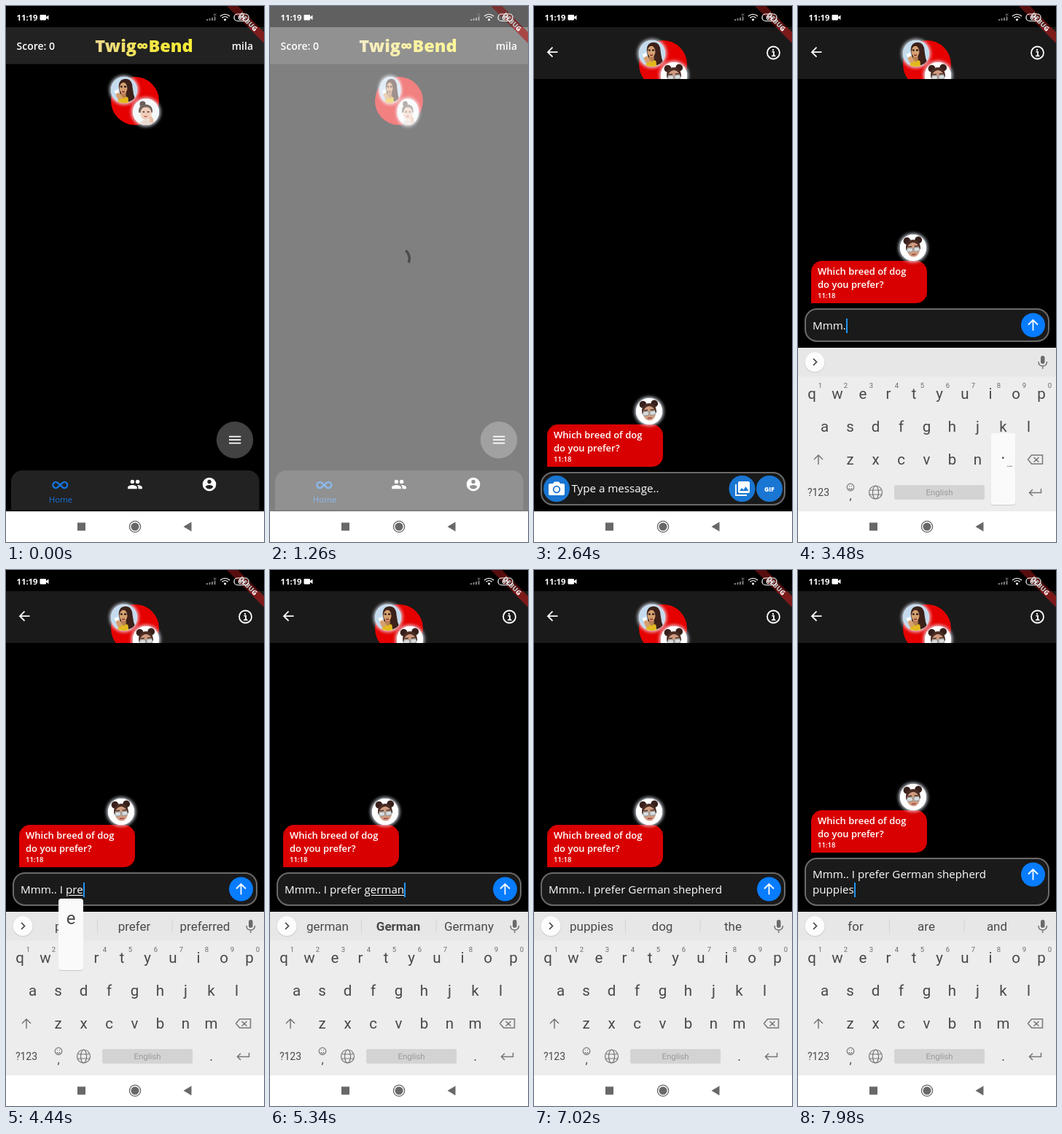
An HTML page that plays this animation: 354 by 734 pixels, repeating every 8000 ms.

```html
<!DOCTYPE html>
<html lang="en">
<head>
<meta charset="utf-8">
<title>Chat</title>
<style>
html, body { margin: 0; width: 100%; height: 100%; overflow: hidden; background: #000; }
#stage { position: relative; width: 354px; height: 734px; overflow: hidden; background: #000; font-family: "Open Sans", sans-serif; }
.layer { position: absolute; left: 0; top: 0; width: 354px; height: 734px; overflow: visible; }
text { font-family: "Open Sans", sans-serif; white-space: pre; }
.kb text { font-family: Roboto, sans-serif; }
.w { fill: #fff; }
.line { fill: none; stroke: #fff; stroke-width: 1.8; }
.grey { fill: none; stroke: #777; stroke-width: 1.5; }
.thin { stroke-width: 1.2; }
.mid { text-anchor: middle; }

#chat, #hero, #heroClip, #barrier, #bubble, #lift, #keys, #flip {
  animation-duration: 8s; animation-iteration-count: infinite; animation-timing-function: linear;
}
#chat { background: linear-gradient(#000 29px, #1a1a1a 29px 100px, #000 100px); animation-name: page; }
@keyframes page {
  0%, 19.5% { opacity: 0; transform: translateY(173px); animation-timing-function: cubic-bezier(.4, 0, .2, 1); }
  23.25%, 100% { opacity: 1; transform: none; }
}
#hero { animation-name: fly; }
@keyframes fly {
  0%, 19.5% { transform: translateY(50px); animation-timing-function: cubic-bezier(.4, 0, .2, 1); }
  23.25%, 100% { transform: none; }
}
#heroClip { animation-name: crop; }
@keyframes crop {
  0%, 23.24% { clip-path: inset(0 0 0 0); }
  23.25%, 100% { clip-path: inset(0 0 634px 0); }
}
#disc { position: absolute; left: 144px; top: 47px; width: 66px; height: 66px; border-radius: 50%; background: #e60000; }
#flip { position: absolute; left: 144px; top: 47px; width: 66px; height: 66px; animation-name: turn; }
@keyframes turn {
  0%, 2.25% { transform: rotateY(0); }
  17.25%, 100% { transform: rotateY(360deg); }
}
.face { position: absolute; width: 36px; height: 36px; border-radius: 50%; overflow: hidden; box-shadow: 0 0 4px 2px rgba(235, 244, 255, .8); background: #fff; }
.face svg { display: block; width: 36px; height: 36px; }
#barrier { background: rgba(255, 255, 255, .5); animation-name: dim; }
@keyframes dim {
  0%, 13.55% { opacity: 0; }
  15.45%, 19.5% { opacity: 1; }
  21.4%, 100% { opacity: 0; }
}
#lift { animation-name: lift; }
@keyframes lift {
  0%, 36% { transform: none; animation-timing-function: cubic-bezier(.2, 0, .2, 1); }
  38.75%, 100% { transform: translateY(-224px); }
}
#keys { animation-name: keys; }
@keyframes keys {
  0%, 36% { transform: translateY(224px); animation-timing-function: cubic-bezier(.2, 0, .2, 1); }
  38.75%, 100% { transform: none; }
}
#bubble { animation-name: show; }
@keyframes show {
  0%, 25.5% { opacity: 0; }
  28%, 100% { opacity: 1; }
}
#box { position: absolute; left: 9px; bottom: 50px; width: 332px; height: 42px; border: 2px solid #6a6a6a; border-radius: 17px; background: #1a1a1a; }
#field { position: absolute; left: 20px; bottom: 63px; width: 278px; color: #fff; font-size: 15.15px; line-height: 20.5px; white-space: pre-wrap; text-underline-offset: 2px; }
#caret { position: relative; }
#caret i { position: absolute; left: 0; top: 1px; width: 2px; height: 20px; background: #2196f3; }
</style>
</head>
<body>
<div id="stage">
  <svg width="0" height="0" style="position:absolute">
    <symbol id="woman" viewBox="0 0 40 40">
      <rect width="40" height="40" fill="#c4dcee"/>
      <path d="M12 15Q12 3 23 3Q33 4 33 17Q34 27 37 34L27 38L14 27Z" fill="#3c211a"/>
      <path d="M10 40Q11 31 18 29L26 31L27 40Z" fill="#e3b91d"/>
      <path d="M16 23H23V30L20 33L15 29Z" fill="#b97f54"/>
      <ellipse cx="19" cy="17" rx="6" ry="8.500" fill="#d6a071"/>
      <path d="M12 17Q12 7 19 7Q25 8 26 22Q30 8 24 4Q12 3 12 17Z" fill="#3c211a"/>
      <path d="M14.500 15h3M20 15h3.500" stroke="#1a1210" stroke-width="2"/>
      <path d="M17 22q2 2 4 0" stroke="#7a2420" stroke-width="1.500" fill="none"/>
      <path d="M5 21L11 19L13 25L8 27Z" fill="#fff"/>
      <path d="M7 27Q11 22 15 26L17 33L11 35Z" fill="#d6a071"/>
    </symbol>
    <symbol id="bun" viewBox="0 0 40 40">
      <rect width="40" height="40" fill="#f4f8fa"/>
      <circle cx="15" cy="8" r="4.500" fill="#6a5e58"/>
      <path d="M9 21Q8 9 19 9Q31 9 30 21Z" fill="#70645d"/>
      <path d="M10 40Q11 33 20 32Q29 33 31 40Z" fill="#ead9d2"/>
      <ellipse cx="20" cy="22" rx="8.500" ry="10" fill="#f1cdb8"/>
      <path d="M11 19Q14 12 20 13Q27 12 29 19Q28 9 19 9Q11 9 11 19Z" fill="#70645d"/>
      <path d="M15 20h3M22 20h3" stroke="#333" stroke-width="1.600"/>
      <path d="M17 27h5" stroke="#b25a55" stroke-width="1.400"/>
      <path d="M26 36Q23 29 28 26L31 30L32 37Z" fill="#e9bea5"/>
    </symbol>
    <symbol id="buns" viewBox="0 0 40 40">
      <rect width="40" height="40" fill="#fff"/>
      <g transform="rotate(-5 20 20)">
        <circle cx="11.500" cy="9" r="5.500" fill="#38211c"/><circle cx="29" cy="9" r="5.500" fill="#38211c"/>
        <path d="M9 23Q8 8 20 8Q32 8 31 23Z" fill="#4a2c24"/>
        <ellipse cx="20" cy="23" rx="9.500" ry="11" fill="#cf9c80"/>
        <path d="M10 20Q13 13 20 12Q27 13 30 20Q30 8 20 8Q10 8 10 20Z" fill="#4a2c24"/>
        <path d="M12 18h6M22 18h6" stroke="#38211c" stroke-width="1.500"/>
        <g fill="#d9dcdc" stroke="#87959b"><rect x="10.500" y="20" width="8.500" height="6" rx="2"/><rect x="21" y="20" width="8.500" height="6" rx="2"/></g>
        <path d="M19 22h2" stroke="#87959b"/>
        <path d="M17 30q3 1 6 0" stroke="#97433e" stroke-width="1.800" fill="none"/>
      </g>
    </symbol>
  </svg>

  <svg class="layer" viewBox="0 0 354 734">
    <defs><linearGradient id="gold"><stop offset="0" stop-color="#ecd98c"/><stop offset=".6" stop-color="#f5e642"/><stop offset="1" stop-color="#f7ee35"/></linearGradient></defs>
    <rect y="29" width="354" height="50.500" fill="#222"/>
    <g class="w" font-size="14" font-weight="600">
      <text x="14.500" y="60">Score: 0</text><text x="339" y="60" text-anchor="end">mila</text>
    </g>
    <text class="mid" x="189.500" y="63" font-size="23.500" font-weight="800" fill="url(#gold)">Twig∞Bend</text>
    <circle cx="314" cy="594.200" r="25.200" fill="#424242"/>
    <path class="line" d="M306 589.600h16.300M306 594.100h16.300M306 598.600h16.300"/>
    <path d="M7 690V651a15 15 0 0 1 15-15H332.500a15 15 0 0 1 15 15V690Z" fill="#222"/>
    <path transform="translate(63.500 645.200) scale(.9)" d="M12 12L8.500 15.100A4.380 4.380 0 1 1 8.500 8.900L15.500 15.100A4.380 4.380 0 1 0 15.500 8.900Z" fill="none" stroke="#1673dc" stroke-width="2.700"/>
    <text class="mid" x="75" y="680" font-size="11.500" fill="#1673dc">Home</text>
    <g class="w" transform="translate(166.200 644.200) scale(.9)">
      <circle cx="8" cy="8" r="3"/><circle cx="16" cy="8" r="3"/>
      <path d="M1 19V16.500C1 14 6 13 8 13S15 14 15 16.500V19ZM17 19V16.500Q17 14.300 15 13C18 12.800 23 14 23 16.500V19Z"/>
    </g>
    <g transform="translate(279 655)"><circle class="w" r="9.300"/><circle cy="-3.600" r="2.700" fill="#222"/><path d="M-5.400 3.500Q-4.500 .9 0 .9T5.400 3.500Q3.500 6.400 0 6.400T-5.400 3.500Z" fill="#222"/></g>
  </svg>

  <div id="chat" class="layer">
    <svg class="layer" viewBox="0 0 354 734">
      <path class="line" d="M32.500 63.200H19.500M25.500 56.700L19 63.200L25.500 69.700"/>
      <circle class="line" cx="328.500" cy="64" r="8.500"/>
      <path class="line" d="M326.500 62.700h2.500v5.500M326 68.300h5.500M328 59v1.900"/>
    </svg>
    <div id="lift" class="layer">
      <div id="bubble" class="layer"><div id="raise" class="layer">
        <svg class="layer" viewBox="0 0 354 734">
          <path d="M18 631V588a15 15 0 0 1 15-15H162a15 15 0 0 1 15 15V616a15 15 0 0 1-15 15Z" fill="#d80000"/>
          <g class="w" font-weight="600" font-size="13">
            <text x="27" y="592">Which breed of dog</text><text x="27" y="610">do you prefer?</text>
            <text x="27" y="624" font-size="9.500">11:18</text>
          </g>
        </svg>
        <div class="face" style="left:140px;top:537px"><svg><use href="#buns"/></svg></div>
      </div></div>
      <div id="box"></div>
      <svg id="idle" class="layer" viewBox="0 0 354 734">
        <g fill="#1976d2"><circle cx="31" cy="661" r="18"/><circle cx="285.500" cy="661" r="18"/><circle cx="323" cy="661" r="18"/></g>
        <path class="w" d="M22 654H26L28 651.500H34L36 654H40Q42 654 42 656V668Q42 670 40 670H22Q20 670 20 668V656Q20 654 22 654Z"/>
        <circle cx="31" cy="662" r="4.300" fill="#fff" stroke="#1976d2" stroke-width="1.800"/>
        <rect class="w" x="280" y="651" width="16" height="16" rx="2"/>
        <path d="M282 664L285 660L287.500 662.500L290.500 658L294.500 664Z" fill="#1976d2"/>
        <path class="line" d="M277 655V670H292"/>
        <text class="w mid" x="323" y="664.500" font-size="8.500" font-weight="800">GIF</text>
        <text class="w" x="51.500" y="666" font-size="15.150">Type a message..</text>
        <rect id="hintCaret" x="51" y="651" width="2" height="20" fill="#2196f3"/>
      </svg>
      <svg id="send" class="layer" viewBox="0 0 354 734">
        <circle cx="322.500" cy="661" r="16.500" fill="#087cff"/>
        <path class="line" d="M322.500 668.500V654.500M316 660.500L322.500 654L329 660.500"/>
      </svg>
      <div id="field"></div>
    </div>
  </div>

  <div id="heroClip" class="layer"><div id="hero" class="layer">
    <div id="disc"></div>
    <div id="flip">
      <div class="face" style="left:0;top:0"><svg><use href="#woman"/></svg></div>
      <div class="face" style="left:29.500px;top:29.500px"><svg><use id="friend" href="#bun"/></svg></div>
    </div>
  </div></div>

  <svg id="keys" class="layer kb" viewBox="0 0 354 734"></svg>

  <div id="barrier" class="layer"><svg class="layer" viewBox="0 0 354 734"><path id="spin" fill="none" stroke="#4c4c4c" stroke-width="3.600"/></svg></div>

  <svg class="layer" viewBox="0 0 354 734">
    <g transform="translate(354 0) rotate(45)">
      <rect x="-40" y="25.300" width="80" height="10.800" fill="#b71c1c" fill-opacity=".63"/>
      <text class="w mid" y="34" font-size="9.200" font-weight="800">DEBUG</text>
    </g>
    <rect width="354" height="29" fill-opacity=".25"/>
    <g class="w">
      <text x="14.500" y="20" font-size="11.300" font-weight="700">11:19</text>
      <rect x="46.500" y="12" width="8.500" height="7.500" rx="1"/><path d="M55 15L58.500 12.500V19L55 16.500Z"/>
      <path d="M275 18h2v2h-2zM278.500 17h2v3h-2zM282 16h2v4h-2zM285.500 14.500h2v5.500h-2z" opacity=".5"/>
    </g>
    <path d="M285 10.500l3 3m0-3l-3 3" stroke="#888"/>
    <path class="line thin" d="M294 14Q300.500 8.500 307 14M296.300 16.300Q300.500 12.700 304.700 16.300"/>
    <circle class="w" cx="300.500" cy="18.700" r="1.500"/>
    <rect class="line thin" x="313" y="11" width="20" height="9.500" rx="4.500"/>
    <text class="w mid" x="323" y="18.700" font-size="8" font-weight="700">65</text>
    <rect y="692" width="354" height="42" fill="#fff"/>
    <rect x="98" y="707.500" width="11" height="11" fill="#686868"/>
    <circle cx="177" cy="713" r="5.500" fill="#686868"/><circle cx="177" cy="713" r="7.600" fill="none" stroke="#686868" stroke-width="1.300"/>
    <path d="M254.500 706.500V719.500L243.500 713Z" fill="#686868"/>
  </svg>
</div>

<script>
const $ = id => document.getElementById(id);
const LOOP = 8000;

// Keyboard
const spots = {};
const label = (x, y, s, size, more = "") =>
  `<text class="mid" x="${x}" y="${y}" font-size="${size}" fill="#484848" ${more}>${s}</text>`;
function row(chars, x0, y) {
  return [...chars].map((c, i) => {
    const x = x0 + 35 * i;
    spots[c] = [x, y];
    return label(x, y + 7, c, 20.5, `data-key="${c}"`);
  }).join("");
}
function buildKeys() {
  spots["."] = [281.5, 666];
  let out = `<rect y="468" width="354" height="224" fill="#ededed"/><rect y="468" width="354" height="39.5" fill="#e7e7e7"/>
    <circle cx="23" cy="488" r="14" fill="#ccc"/><circle cx="23" cy="487.5" r="13.5" fill="#fcfcfc"/>
    <path d="M21 483L25.5 487.5L21 492" fill="none" stroke="#444" stroke-width="1.7"/>
    <rect x="333" y="479" width="5.5" height="11" rx="2.7" fill="#6a6a6a"/><path class="grey" d="M330 487Q330 493 335.7 493T341.5 487M335.7 493V497"/>
    <path id="bars" d="M125.5 478V497M228 478V497" stroke="#d4d4d4"/>`;
  out += [79, 176, 273].map((x, i) => label(x, 494, "", 17, `id="tip${i}"`)).join("");
  out += row("qwertyuiop", 19, 531) + row("asdfghjkl", 36.5, 576) + row("zxcvbnm", 71.5, 621);
  out += [..."1234567890"].map((d, i) => label(30.5 + 35 * i, 523, d, 9.5, 'opacity=".8"')).join("");
  out += label(28, 671, "?123", 14) + label(72, 676, ",", 16) + label(281.5, 672, ".", 18);
  out += `<path class="grey" d="M28 628V615M22 621L28 615L34 621"/>
    <path class="grey" d="M320.5 615H335.5V627H320.5L315.5 621ZM323.5 618L330.5 624.5M330.5 618L323.5 624.5"/>
    <circle class="grey thin" cx="72" cy="659" r="4.8"/><path class="grey thin" d="M69.5 660.5Q72 663.5 74.5 660.5M70 657.5h1M73 657.5h1"/>
    <circle class="grey thin" cx="106.5" cy="666" r="9"/><ellipse class="grey thin" cx="106.5" cy="666" rx="4" ry="9"/><path class="grey thin" d="M98 663H115M98 669H115"/>
    <rect x="132" y="656" width="124" height="20" rx="2" fill="#d3d3d3"/>
    <text class="mid" x="194" y="670" font-size="11.5" fill="#9a9a9a">English</text>
    <path class="grey" d="M333.5 661V666.5H317.5M322 662L317.5 666.5L322 671"/>
    <g id="pop"><rect x="-17" y="-80" width="34" height="98" rx="4" fill="#bbb" opacity=".7"/>
    <rect x="-17" y="-81" width="34" height="98" rx="4" fill="#fafafa"/>${label(0, -46, "", 24, 'id="popKey"')}${label(9, -35, "…", 12, 'id="popMore"')}</g>`;
  $("keys").innerHTML = out;
}
buildKeys();
const keyCaps = [...document.querySelectorAll("[data-key]")];

// Typing: one time for each key, then three words picked from the strip
const typed = "Mmm.. I prefer german";
const times = [3140, 3240, 3330, 3420, 3790, 3910, 4030, 4130, 4240, 4330, 4410, 4500, 4580, 4670, 4750, 4820, 4890, 4970, 5060, 5130, 5200];
const base = "Mmm.. I prefer German ";
const steps = [
  { at: 0, text: "" }, { at: 2820, text: "" },
  ...times.map((at, i) => ({ at, text: typed.slice(0, i + 1), key: typed[i] })),
  { at: 5640, text: base, tips: ["shepherd", "and", "shepherds"] },
  { at: 6300, text: base + "shepherd ", tips: ["puppies", "dog", "the"] },
  { at: 7490, text: base + "shepherd puppies", tips: ["for", "are", "and"] }
];
function tipsFor(s) {
  if (s.tips) return s.tips;
  const word = s.text.match(/\w*$/)[0];
  if (word[0] === "g") return [word, "German", "Germany"];
  if (word[0] === "p") return [word, "prefer", "preferred"];
  if (s.text.endsWith("prefer ")) return ["to", "the", "not"];
  if (s.text.endsWith("I ")) return ["am", "have", "will"];
  return ["", "", ""];
}

let last = -1;
function showStep(i) {
  if (i === last) return;
  last = i;
  const s = steps[i], word = s.key ? s.text.match(/\w*$/)[0] : "";
  const head = s.text.slice(0, s.text.length - word.length);
  $("field").innerHTML = s.text && `${head}<u>${word}</u><span id="caret"><i></i></span>`;
  $("idle").style.display = s.text ? "none" : "";
  $("send").style.display = s.text ? "" : "none";
  const grow = s.text.endsWith("puppies") ? 20 : 0;
  $("box").style.height = 42 + grow + "px";
  $("raise").style.transform = $("send").style.transform = `translateY(${-grow}px)`;
  const tips = tipsFor(s);
  tips.forEach((tip, n) => $("tip" + n).textContent = tip);
  $("tip1").setAttribute("font-weight", word === "german" ? 700 : 400);
  $("bars").style.display = tips[0] ? "" : "none";
  const upper = !s.text || s.text === "Mmm.. ";
  keyCaps.forEach(k => k.textContent = upper ? k.dataset.key.toUpperCase() : k.dataset.key);
}

function showPop(s, t) {
  const spot = s.key && t - s.at < 110 && spots[s.key.toLowerCase()];
  $("pop").style.display = spot ? "" : "none";
  if (!spot) return;
  $("pop").setAttribute("transform", `translate(${spot})`);
  $("popKey").textContent = s.key;
  $("popMore").style.display = s.key === "." ? "" : "none";
}

// cubic-bezier(.4, 0, .2, 1)
function ease(x) {
  if (x <= 0) return 0;
  if (x >= 1) return 1;
  let lo = 0, hi = 1;
  for (let i = 0; i < 20; i++) {
    const m = (lo + hi) / 2, n = 1 - m;
    if (1.2 * n * n * m + .6 * n * m * m + m ** 3 < x) lo = m; else hi = m;
  }
  return 3 * lo * lo - 2 * lo ** 3;
}
function spinner(ms) {
  const p = ms / 1333 % 1, full = 1.5 * Math.PI;
  const head = ease(p * 2) * full, tail = ease(p * 2 - 1) * full;
  const a = -Math.PI / 2 + tail + ms / 2222 * 2 * Math.PI + p * Math.PI / 2;
  const sweep = Math.max(head - tail, .001);
  const at = r => `${177 + 14.4 * Math.cos(r)} ${346 + 14.4 * Math.sin(r)}`;
  $("spin").setAttribute("d", `M${at(a)}A14.4 14.4 0 ${+(sweep > Math.PI)} 1 ${at(a + sweep)}`);
}

function draw(t) {
  let i = steps.length - 1;
  while (steps[i].at > t) i--;
  showStep(i);
  showPop(steps[i], t);
  const on = t >= 2820 && Math.floor((t - steps[i].at) / 500) % 2 === 0;
  $("hintCaret").style.display = on ? "" : "none";
  if ($("caret")) $("caret").style.visibility = on ? "visible" : "hidden";
  $("friend").setAttribute("href", t < 1700 ? "#bun" : "#buns");
  spinner(Math.max(0, t - 1085));
}

let start;
function tick(now) {
  start ??= now;
  draw((now - start) % LOOP);
  requestAnimationFrame(tick);
}
draw(0);
requestAnimationFrame(tick);
</script>
</body>
</html>
```
